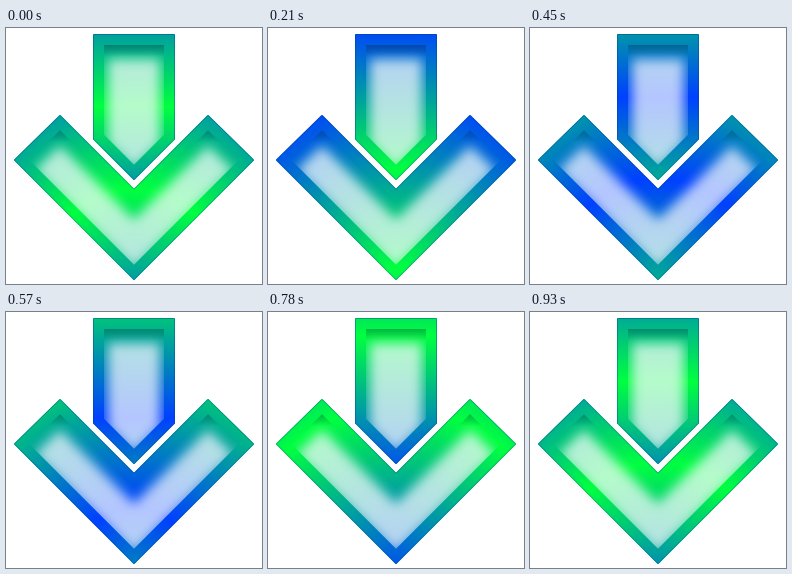
These frames come from a looping animation (256 px wide and 256 px high, 0.96 s). An HTML page with a canvas:

```html
<!DOCTYPE html>
<html lang="en">
<head>
<meta charset="utf-8">
<title>Down arrow</title>
<style>
  html, body { margin: 0; width: 100%; height: 100%; overflow: hidden; background: #fff; }
  canvas { display: block; width: 256px; height: 256px; }
</style>
</head>
<body>
<canvas id="stage" width="256" height="256"></canvas>
<script>
const SIZE = 256, LOOP = 960, STEP = 30, CENTER = 128;
const BORDER = 10, STOPS = 32;
const ctx = document.getElementById('stage').getContext('2d');

// Outlines inset by a perpendicular distance d.
function tagPoints(d) {
  const shoulder = 111 - d * (Math.SQRT2 - 1), half = 40 - d;
  return [[-half, 7 + d], [half, 7 + d], [half, shoulder],
          [0, 151 - d * Math.SQRT2], [-half, shoulder]];
}

function chevronPoints(d) {
  const k = d * Math.SQRT2;
  return [[-74, 88 + k], [0, 162 + k], [74, 88 + k],
          [119 - k, 132], [0, 251 - k], [k - 119, 132]];
}

function outline(points, dy = 0) {
  const path = new Path2D();
  for (const [x, y] of points) path.lineTo(CENTER + x, y + dy);
  path.closePath();
  return path;
}

// Each gradient runs from the bottom tip up to the top edge.
const shapes = [
  { points: tagPoints, gradient: () => ctx.createLinearGradient(0, 151, 0, 6) },
  { points: chevronPoints,
    gradient: () => ctx.createRadialGradient(CENTER, 251, 0, CENTER, 251, 179) }
];

// The glow, bevel and edge never change, so they are drawn only once.
function makeOverlay() {
  const layer = document.createElement('canvas');
  layer.width = layer.height = SIZE;
  const g = layer.getContext('2d');
  for (const { points } of shapes) {
    const innerPoints = points(BORDER), innerTop = innerPoints[0][1];
    const inner = outline(innerPoints);

    g.save();
    g.clip(inner);
    g.filter = 'blur(6px)';
    g.fillStyle = 'rgba(250, 250, 255, 0.72)';
    g.fill(outline(points(14), 10));
    g.restore();

    const shade = g.createLinearGradient(0, innerTop, 0, innerTop + 12);
    shade.addColorStop(0, 'rgba(0, 30, 50, 0.3)');
    shade.addColorStop(1, 'rgba(0, 30, 50, 0)');
    g.fillStyle = shade;
    g.fill(inner);

    g.lineJoin = 'round';
    g.strokeStyle = 'rgba(0, 60, 130, 0.4)';
    g.stroke(outline(points(-0.5)));
  }
  return layer;
}

const overlay = makeOverlay();

// Triangle wave between green and blue, one cycle per unit of position.
function waveColor(position) {
  const cycle = position - 0.25 - Math.floor(position - 0.25);
  const blue = 1 - Math.abs(1 - 2 * cycle);
  return `rgb(0, ${255 - 191 * blue}, ${64 + 191 * blue})`;
}

// Half a wave covers the shape and slides downwards.
function waveFill(gradient, phase) {
  for (let i = 0; i <= STOPS; i++) {
    const offset = i / STOPS;
    gradient.addColorStop(offset, waveColor((1 - offset) / 2 - phase));
  }
  return gradient;
}

function draw(time) {
  const phase = Math.floor((time % LOOP) / STEP) * STEP / LOOP;
  ctx.fillStyle = '#fff';
  ctx.fillRect(0, 0, SIZE, SIZE);
  ctx.lineJoin = 'round';
  ctx.lineWidth = 2;
  for (const { points, gradient } of shapes) {
    const body = outline(points(0));
    ctx.fillStyle = ctx.strokeStyle = waveFill(gradient(), phase);
    ctx.fill(body);
    ctx.stroke(body);
  }
  ctx.drawImage(overlay, 0, 0);
}

function tick() {
  draw(performance.now());
  requestAnimationFrame(tick);
}
tick();
</script>
</body>
</html>
```
